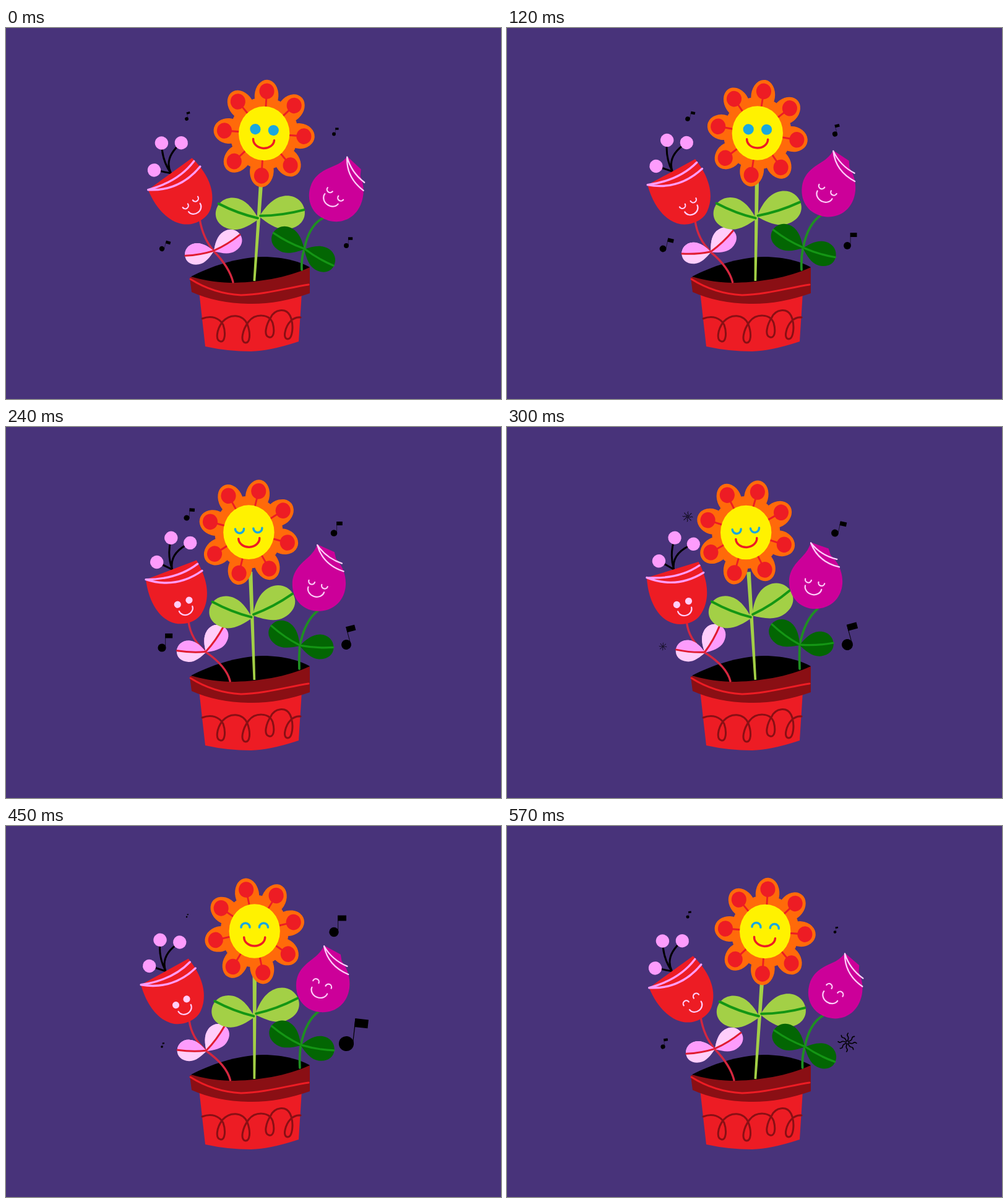
These frames come from a looping animation (800x600 px, 600 ms). An HTML page:

```html
<!DOCTYPE html>
<html lang="en">
<head>
<meta charset="utf-8">
<title>Singing flowers</title>
<style>
  html, body { margin: 0; width: 100%; height: 100%; overflow: hidden; background: #48337a; }
  svg { display: block; width: 100vw; height: 100vh; }
</style>
</head>
<body>
<svg viewBox="0 0 800 600" stroke-linecap="round" stroke-linejoin="round">
  <g id="pot">
    <path fill="#ed1c24" d="M312 426L322 515Q358 523 396 523Q428 522 473 507L478 428Z"/>
    <path fill="#8a0f14" d="M297 404Q300 399 345 405L491 387V429Q440 447 392 446Q340 445 300 427Z"/>
    <path fill="#000" d="M299 402C330 386 372 371 415 370C450 370 478 379 491 387C455 404 405 412 362 412C335 411 315 407 299 402Z"/>
    <path fill="none" stroke="#ed1c24" stroke-width="3" d="M298 406C320 420 345 430 380 432C420 431 455 420 489 415"/>
    <path fill="none" stroke="#8a0f14" stroke-width="3" d="M317 470C332 464 345 469 351 480C356 495 353 508 347 507C338 506 340 488 350 475C362 462 382 462 390 479C396 495 394 510 387 509C378 508 382 488 392 475C402 462 425 461 431 477C435 492 432 502 425 500C416 498 420 480 428 468C434 455 452 452 459 465C466 480 463 503 455 503C446 502 452 482 460 474Q467 467 476 468"/>
  </g>
  <g id="garden"></g>
</svg>
<script>
const garden = document.getElementById("garden");
const RED = "#ed1c24", PINK = "#fd9cfc", PALE = "#ffcefb";
const STEP = 30, STEPS = 20, NOTE_CYCLE = 24;

// Piecewise linear curve through [x, y] points.
function curve(x, points) {
  let i = 1;
  while (i < points.length - 1 && x > points[i][0]) i++;
  const [x0, y0] = points[i - 1], [x1, y1] = points[i];
  return y0 + (y1 - y0) * (x - x0) / (x1 - x0);
}

const group = (transform, ...parts) => `<g transform="${transform}">${parts.join("")}</g>`;
const shape = (d, fill) => `<path d="${d}" fill="${fill}"/>`;
const line = (d, color, width) =>
  `<path d="${d}" fill="none" stroke="${color}" stroke-width="${width}"/>`;
const dot = (x, y, r, fill) => `<circle cx="${x}" cy="${y}" r="${r}" fill="${fill}"/>`;
const arc = (x, y, rx, ry, sweep) => `M${x - rx} ${y}A${rx} ${ry} 0 0 ${sweep} ${x + rx} ${y}`;

const LEAF_TOP = "M0 0C11 -13 26 -27 44 -27C62 -27 74 -14 74 1";
const LEAF = LEAF_TOP + "C74 16 62 27 43 27C26 27 12 13 0 0Z";

function leaf(x, y, side, angle, size, fill, topFill, vein, veinWidth, veinTurn = 0) {
  return group(`translate(${x} ${y}) scale(${side * size} ${size}) rotate(${angle})`,
    shape(LEAF, fill),
    topFill ? shape(LEAF_TOP + "Z", topFill) : "",
    group(`rotate(${veinTurn})`, line("M2 -1Q36 4 73 0", vein, veinWidth / size)));
}

// Origin is the middle of the mouth's upper edge.
function face(transform, mood, f) {
  const eye = x => mood === "open" ? dot(x, f.eyeY, f.eyeR, f.eye)
    : line(arc(x, f.eyeY, f.lidR, f.lidR, mood === "happy" ? 1 : 0), f.lid, f.width);
  return group(transform, eye(-f.eyeX), eye(f.eyeX),
    line(arc(0, 0, f.mouthX, f.mouthY, 0), f.mouth, f.width));
}

const sunFace = { eyeX: 14.7, eyeY: -16, eyeR: 8.6, lidR: 7, eye: "#19a8e0", lid: "#19a8e0",
  mouth: RED, mouthX: 17, mouthY: 14, width: 3.5 };
const cupFace = { eyeX: 10, eyeY: -11, eyeR: 5.6, lidR: 5, eye: PALE, lid: PALE,
  mouth: PALE, mouthX: 11.5, mouthY: 10, width: 2.2 };
const budFace = { ...cupFace, eyeX: 11, eyeY: -10.6, mouthX: 13.5, mouthY: 11.5 };

function sun(beat) {
  const sway = beat < 10 ? 1 - beat / 10 : (beat - 10) / 12;
  const rad = (sway * 31 - 15) / 239, tilt = rad * 180 / Math.PI;
  const mood = beat < 8 ? "open" : beat < 16 ? "asleep" : "happy";
  const around = part => Array.from({ length: 8 }, (_, i) => group(`rotate(${i * 45})`, part)).join("");
  const petal = `<ellipse cy="-61" rx="20.5" ry="26" fill="#ff6a0a"/>`;
  const stamen = line("M0 -42V-60", RED, 3) + dot(0, -68.5, 12.8, RED);
  const cx = 401.2 + 239 * Math.sin(rad), cy = 409 - 239 * Math.cos(rad);
  const lx = 401.5 + 102 * Math.sin(rad), ly = 309;
  return group(`translate(401.2 409) rotate(${tilt})`, shape("M-1.7 0Q-2.2 -80 -3 -175H3.5Q3 -80 2 0Z", "#a3d046")) +
    leaf(lx, ly, -1, -12 - 1.5 * (1 - sway), .95, "#a3d046", "", "#149614", 4, -9) +
    leaf(lx + 1, ly - 4, 1, -33.7 + 25.1 * sway, 1, "#a3d046", "", "#149614", 4) +
    group(`translate(${cx} ${cy}) scale(.94 1)`,
      group(`rotate(${tilt + 45 * beat / 22})`, dot(0, 0, 58.5, "#ff6a0a"), around(petal), around(stamen)),
      dot(0, 0, 43.8, "#fff200")) +
    face(`translate(${cx} ${cy}) rotate(${tilt}) translate(0 10)`, mood, sunFace);
}

function cup(beat) {
  const sway = curve(beat, [[0, 1], [10, 0], [12, -.22], [14, 0], [22, 1]]);
  const tilt = curve(beat, [[0, -36], [10, -17], [12, -24.5], [14, -26.5], [22, -36]]);
  const mood = beat < 8 ? "asleep" : beat < 19 ? "open" : "happy";
  const bx = 361 + 6 * sway, lx = 320 + 16 * sway, ly = 365 - 4 * sway;
  const tx = 290.5 + 24.5 * sway, ty = 318 - 7 * sway;
  return line(`M${bx} 411Q${bx - 6} 387 ${lx} ${ly}Q${tx + 3} ${ly - 21} ${tx - 2 * sway} ${ty - 2}`, "#d4273f", 3.4) +
    leaf(lx, ly, -1, -6 + 15 * sway, .64, PALE, PINK, "#e01c30", 3) +
    leaf(lx, ly, 1, -61.5 + 29 * sway, .68, PINK, PALE, "#e01c30", 3) +
    group(`translate(${tx} ${ty}) rotate(${tilt})`,
      line("M5.6 -90Q6 -116 22 -138M5.6 -90Q10 -117 48 -120M5.6 -90L-13 -110", "#000", 3),
      dot(22, -138.5, 10.7, PINK), dot(48, -120, 10.7, PINK), dot(-13.5, -110, 10.7, PINK),
      shape("M-40 -90C-48 -58 -43 -28 -28 -13C-14 2 12 4 25 -7C47 -24 54 -55 47.5 -90Z", RED),
      line("M-40 -90Q8 -72 47 -84M-40 -90Q0 -58 50 -71", PINK, 3.4),
      face("translate(3.5 -23)", mood, cupFace));
}

function bud(beat) {
  const sway = curve(beat, [[0, 1], [10.8, -.08], [23, 1]]);
  const mood = beat < 12 ? "asleep" : beat < 16 ? "open" : "happy";
  const bx = 473 + 5 * sway, lx = 473 + 9 * sway, ly = 353 + 5 * sway;
  const tx = 502 + 13 * sway, ty = 294 + 12 * sway;
  return line(`M${bx} 391Q${bx - 1} 372 ${lx} ${ly}Q${lx + 8} ${ly - 41} ${tx} ${ty}`, "#1f8f22", 3.8) +
    leaf(lx, ly, -1, -37 + 9 * sway, .77, "#036603", "", "#149614", 3.2) +
    leaf(lx, ly, 1, -4 + 33 * sway, .74, "#036603", "", "#149614", 3.2) +
    group(`translate(${499 + 34 * sway} ${251 + 19 * sway}) rotate(${-8 + 23.7 * sway})`,
      shape("M1 -65L28 -51L30 -40C40 -28 45 -12 43 4C40 28 22 43 0 43C-26 43 -43 24 -43 0C-43 -22 -30 -33 -16 -44Q-4 -53 1 -65Z", "#cc0099"),
      line("M1 -64Q14 -42 39 -32M1 -64Q8 -32 41 -19", PALE, 2.3),
      face("translate(-5 8) rotate(22)", mood, budFace));
}

const NOTE_BEATS = [0, 4, 6, 10, 14, 18, 22];
const notes = [
  { x: 292, y: 147, burst: 10, size: 0, grow: .21, star: 8, lean: [-15, 12, 8, 0, 0, -8, -6] },
  { x: 252, y: 357, burst: 10, size: 0, grow: .3, star: 6, lean: [15, 13, 0, 0, 0, -13, -8] },
  { x: 530, y: 171.5, burst: 18, size: 1.1, grow: .3, star: 8, lean: [0, -15, -12, 12, 0, 0, -8] },
  { x: 550, y: 352, burst: 22, size: 2.9, grow: .51, star: 15, lean: [0, 0, -14, -15, 13, 0, 0] }
];

function note(n, beat) {
  const age = (beat - n.burst + NOTE_CYCLE) % NOTE_CYCLE;
  if (age < 1.5) {
    const rays = Array.from({ length: 8 }, (_, i) =>
      group(`rotate(${i * 45 + 5})`, line("M0 -.15Q.15 -.5 0 -.65T0 -1", "#000", .11)));
    return group(`translate(${n.x} ${n.y - 2}) scale(${n.star})`, ...rays);
  }
  const lean = curve(beat, NOTE_BEATS.map((b, i) => [b, n.lean[i]]));
  return group(`translate(${n.x} ${n.y}) rotate(${lean}) scale(${n.size + n.grow * age})`,
    dot(0, 0, 1, "#000"), line("M.86 -.1V-3.4", "#000", .1),
    shape("M.8 -3.5H2.6V-2.35H.8Z", "#000"));
}

function draw(step) {
  // The tune hurries slightly in its second half.
  const beat = curve(step, [[0, 0], [10, 10], [13, 14], [17, 18], [19, 22]]);
  garden.innerHTML = cup(beat) + sun(beat) + bud(beat) + notes.map(n => note(n, beat)).join("");
}

const start = performance.now();
let shown = -1;
function tick() {
  const step = Math.floor((performance.now() - start) / STEP) % STEPS;
  if (step !== shown) draw(shown = step);
  requestAnimationFrame(tick);
}
tick();
</script>
</body>
</html>
```
